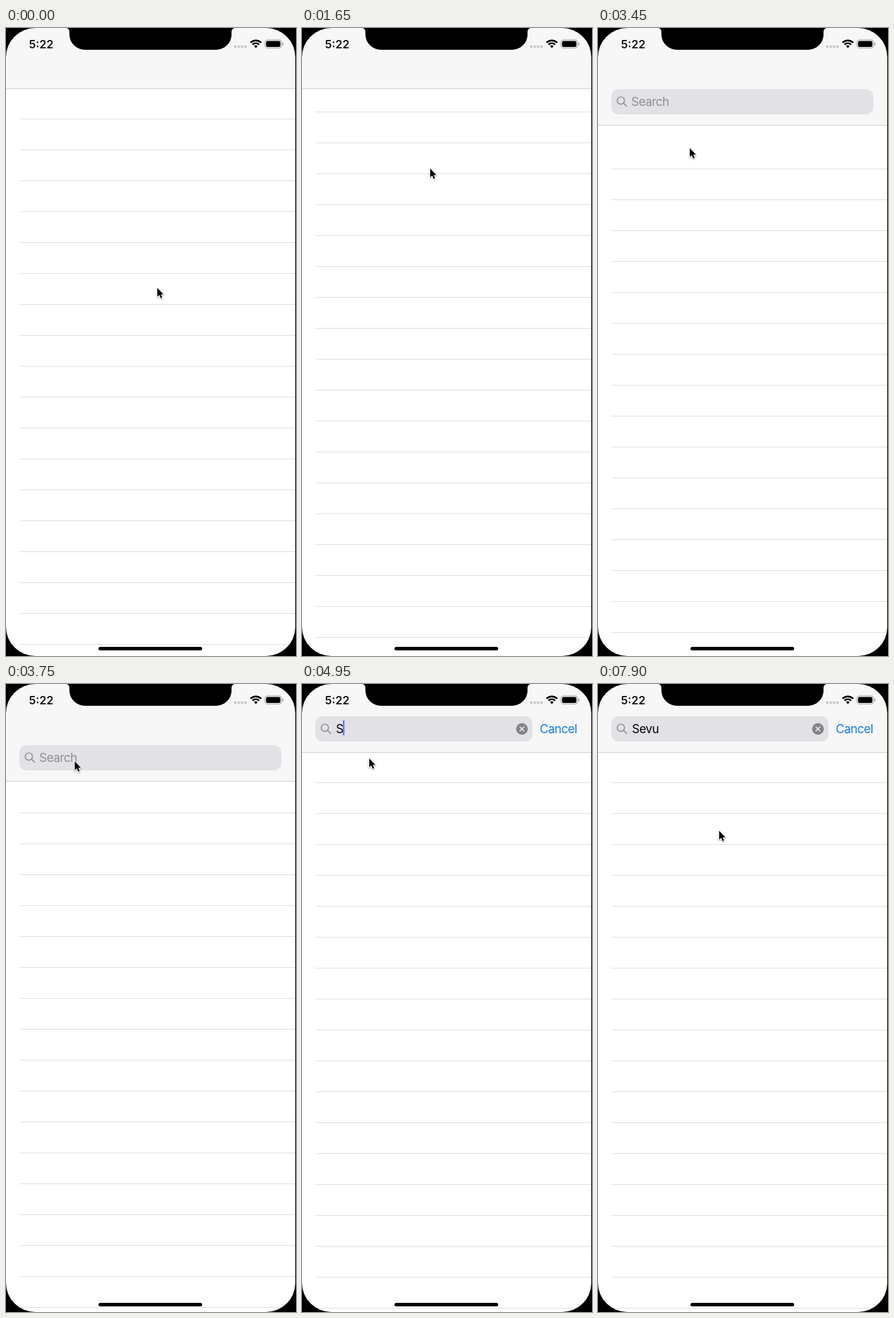
An HTML page with a canvas for the animation above (8000 ms loop, 414 px wide and 894 px high).

```html
<!DOCTYPE html>
<html lang="en">
<head>
<meta charset="utf-8">
<title>Repository search</title>
<style>
  html, body { margin: 0; width: 100%; height: 100%; overflow: hidden; background: #000; }
  canvas { display: block; width: 414px; height: 894px; }
</style>
</head>
<body>
<canvas id="stage" width="414" height="894"></canvas>
<script>
const W = 414, H = 894, EDGE = 413, LOOP = 8000, STEP = 50;
const ctx = document.getElementById('stage').getContext('2d');
const FONT = 'Inter, Roboto, sans-serif';

const REPOS = ['5Artists', 'BigDataAnalysis', 'Biograf', 'ChainedAlertController', 'classifier',
  'CocoaHeadsNL-iOS', 'CoreMLDemo', 'dbConnect', 'dropbox-sdk-python', 'equiv',
  'extension-ios', 'extension-safari', 'extensions', 'extensions-demo'];

const QUERY = 'Sevu';
const KEY_TIMES = [4600, 5750, 6500, 6950];

// pointer moves: start, end, x, y
const HOME = [216, 370];
const MOVES = [
  [1225, 1350, 190, 216], [1350, 1500, 183, 200], [1925, 2100, 182, 152], [2325, 2700, 182, 368],
  [3225, 3450, 131, 171], [3450, 3850, 96, 106], [7375, 7900, 173, 209]
];

const clamp = v => Math.max(0, Math.min(1, v));
const smooth = v => { v = clamp(v); return v * v * (3 - 2 * v); };
const easeOut = v => 1 - (1 - clamp(v)) ** 2;
const spring = s => s > 0 ? (1 + s) * Math.exp(-s) : 1;

function text(str, x, y, color = '#000', size = 17, weight = 400, spacing = -0.42) {
  ctx.font = `${weight} ${size}px ${FONT}`;
  ctx.letterSpacing = spacing + 'px';
  ctx.fillStyle = color;
  ctx.fillText(str, x, y);
  return ctx.measureText(str).width;
}

function box(x, y, w, h, color) {
  ctx.fillStyle = color;
  ctx.fillRect(x, y, w, h);
}

function pill(x, y, w, h, r, color) {
  ctx.beginPath();
  ctx.roundRect(x, y, w, h, Math.min(r, w / 2, h / 2));
  ctx.fillStyle = color;
  ctx.fill();
}

function disc(x, y, r, color) {
  ctx.beginPath();
  ctx.arc(x, y, r, 0, 7);
  ctx.fillStyle = color;
  ctx.fill();
}

function line(x1, y1, x2, y2, color) {
  ctx.beginPath();
  ctx.moveTo(x1, y1);
  ctx.lineTo(x2, y2);
  ctx.strokeStyle = color;
  ctx.lineWidth = 1.5;
  ctx.lineCap = 'round';
  ctx.stroke();
}

// list offset and bar height: two upward flicks, then a pull that reveals the search field
function layout(t) {
  const settle = 44 * Math.exp(-0.014 * t);
  const flick = 58.5 * smooth((t - 1225) / 200) * spring(0.014 * (t - 1425));
  const pull = 106 * smooth((t - 2450) / 200);
  const reveal = Math.min(52, pull);
  const stretch = (pull - reveal) * spring(0.0098 * (t - 3225));
  const active = smooth((t - 4210) / 300);
  return {
    reveal, active,
    navY: Math.round(86 + reveal - 41 * active),
    shift: Math.round(stretch - settle - flick)
  };
}

function ownerAt(t) {
  if (t < 5800 || t >= 7100) return '';
  return t < 6700 ? 's' : 'se';
}

function drawList(t, { navY, shift }) {
  const owner = ownerAt(t);
  const top = navY + shift;
  const row = owner ? 60 : 44;
  for (let y = top + row - 1; y < H; y += row) box(19, y, EDGE - 19, 1, '#e0e0e1');
  if (!owner) return;
  REPOS.forEach((_, i) => {
    const y = top + i * row;
    const name = REPOS[(i + owner.length - 1) % REPOS.length];
    text('Owner: ' + owner, 19.3, y + 21);
    text('Public: Yes', 267, y + 21);
    text('Repo name: ' + name, 19.3, y + 51);
  });
}

// solid after each key, then fading off and on once a second
function caretAlpha(t, count) {
  if (t < 4250) return 0;
  const idle = count ? t - KEY_TIMES[count - 1] - 450 : -1;
  if (idle < 0) return 1;
  const u = idle % 1000;
  return u < 650 ? 1 - clamp(u / 120) : clamp((u - 650) / 120);
}

function drawSearch(t, { reveal, active }) {
  const h = reveal - 16;
  if (h <= 0) return;
  const top = Math.round(87 - 41 * active);
  const right = 393 - 64 * active;
  const mid = top + h / 2, base = mid + 5.5;
  const count = KEY_TIMES.filter(k => k <= t).length;
  const typed = QUERY.slice(0, count);

  const press = clamp((t - 4180) / 60) * (1 - smooth((t - 4400) / 300));
  pill(19, top, right - 19, h, 10, '#e2e2e6');
  pill(19, top, right - 19, h, 10, `rgba(70,70,75,${0.12 * press})`);

  ctx.globalAlpha = clamp((reveal - 32) / 20);
  ctx.beginPath();
  ctx.arc(32.6, mid - 1.7, 5.2, 0, 7);
  ctx.strokeStyle = '#88888d';
  ctx.lineWidth = 1.4;
  ctx.stroke();
  line(36.5, mid + 2.2, 40.8, mid + 6.3, '#88888d');
  const width = typed ? text(typed, 48.4, base) : 0;
  if (!typed) text('Search', 47.6, base, '#8e8e92');

  ctx.globalAlpha = caretAlpha(t, count);
  box(48 + width, top + 6, 2, 21, '#4468e4');
  ctx.globalAlpha = 1;

  if (typed) {
    const x = right - 15, d = 2.9;
    disc(x, mid, 8.3, '#818186');
    line(x - d, mid - d, x + d, mid + d, '#e6e6e9');
    line(x - d, mid + d, x + d, mid - d, '#e6e6e9');
  }
  ctx.globalAlpha = active;
  text('Cancel', 339.4 + 64 * (1 - active), base, '#1277ea');
  ctx.globalAlpha = 1;
}

function drawStatus() {
  text('5:22', 32.8, 28.6, '#111', 16, 600, 0);
  for (let i = 0; i < 4; i++) disc(327.2 + i * 4.9, 26.6, 1.9, '#c3c3c4');

  const cx = 356.7, cy = 28.3, up = -Math.PI / 2;
  ctx.strokeStyle = ctx.fillStyle = '#000';
  ctx.lineWidth = 2.4;
  ctx.lineCap = 'butt';
  for (const r of [10.6, 6.7]) {
    ctx.beginPath();
    ctx.arc(cx, cy, r, up - 0.8, up + 0.8);
    ctx.stroke();
  }
  ctx.beginPath();
  ctx.moveTo(cx, cy + 0.4);
  ctx.arc(cx, cy, 3.6, up - 0.8, up + 0.8);
  ctx.fill();

  ctx.beginPath();
  ctx.roundRect(369.5, 16.9, 24, 11.6, 3.6);
  ctx.strokeStyle = '#a3a3a3';
  ctx.lineWidth = 1;
  ctx.stroke();
  pill(371.2, 18.5, 20.6, 8.4, 2.2, '#000');
  pill(394.6, 20.7, 1.5, 4, 0.8, '#a3a3a3');
}

function drawDevice() {
  ctx.fillStyle = '#000';
  ctx.beginPath();
  ctx.rect(0, 0, W, H);
  ctx.roundRect(0, 0, EDGE, H, 41.5);
  ctx.fill('evenodd');

  const left = 90.5, right = 322, bottom = 31;
  ctx.beginPath();
  ctx.moveTo(left - 5, 0);
  ctx.arcTo(left, 0, left, 5, 5);
  ctx.arcTo(left, bottom, left + 22, bottom, 22);
  ctx.arcTo(right, bottom, right, 5, 22);
  ctx.arcTo(right, 0, right + 5, 0, 5);
  ctx.fill();

  pill(132, 881, 148, 5, 2.5, '#000');
}

function pointerAt(t) {
  let [x, y] = HOME;
  for (const [from, to, nx, ny] of MOVES) {
    const k = easeOut((t - from) / (to - from));
    x += (nx - x) * k;
    y += (ny - y) * k;
  }
  return [x, y];
}

const ARROW = new Path2D('M0 0V12.6L2.9 10 5 14.7 7 13.8 5 9.2H8.9Z');

function drawPointer(t) {
  ctx.save();
  ctx.translate(...pointerAt(t));
  ctx.lineJoin = 'round';
  ctx.shadowColor = 'rgba(0,0,0,.35)';
  ctx.shadowBlur = 2;
  ctx.shadowOffsetY = 1;
  ctx.strokeStyle = '#fff';
  ctx.lineWidth = 2;
  ctx.stroke(ARROW);
  ctx.shadowColor = 'transparent';
  ctx.fillStyle = '#000';
  ctx.fill(ARROW);
  ctx.restore();
}

function draw(t) {
  const view = layout(t);
  box(0, 0, W, H, '#fff');
  drawList(t, view);
  box(0, 0, W, view.navY, '#f7f7f7');
  box(0, view.navY, W, 1, '#cfcfd0');
  drawSearch(t, view);
  drawStatus();
  drawDevice();
  drawPointer(t);
}

const start = performance.now();
function tick() {
  const t = (performance.now() - start) % LOOP;
  draw(Math.floor(t / STEP) * STEP);
  requestAnimationFrame(tick);
}
tick();
</script>
</body>
</html>
```
